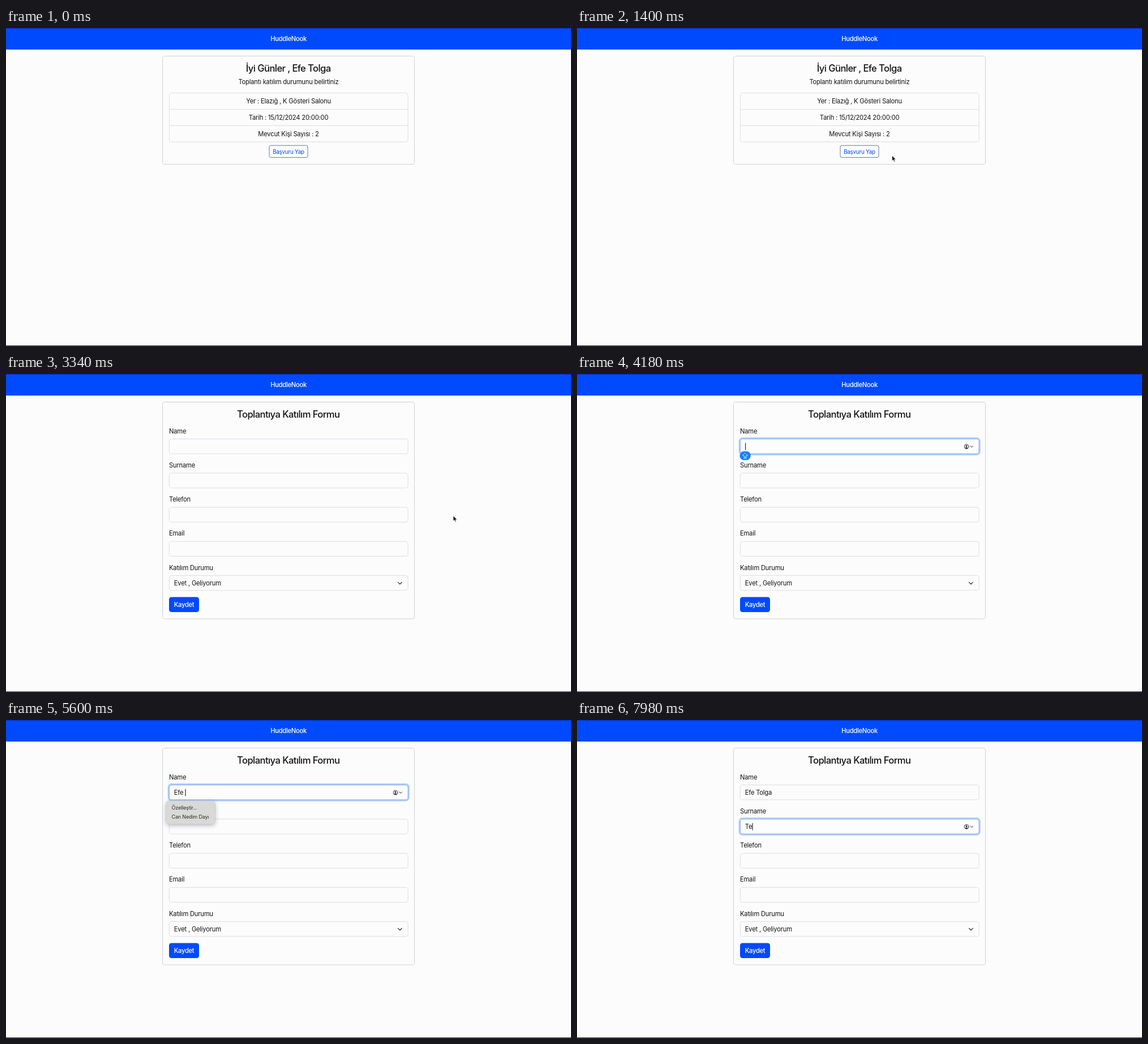
An HTML page that plays this animation: 998x561 px, repeating every 8000 ms.

```html
<!DOCTYPE html>
<html lang="tr">
<head>
<meta charset="utf-8">
<title>Toplantı</title>
<style>
html, body { margin: 0; width: 100%; height: 100%; overflow: hidden; background: #fcfcfc; }
svg { display: block; width: 100vw; height: 100vh; }
text { font: 400 11.2px Inter, "Open Sans", sans-serif; letter-spacing: -0.018em; fill: #111214; white-space: pre; }
.mid { text-anchor: middle; }
.title { font-size: 16.6px; font-weight: 500; letter-spacing: -0.035em; }
.strong { font-weight: 500; fill: #fff; letter-spacing: -0.025em; }
.small { font-size: 9.8px; letter-spacing: -0.022em; }
.tiny { font-size: 9px; letter-spacing: -0.02em; fill: #2b2b2b; }
.box { fill: none; stroke: #d9dae2; stroke-width: 0.9; }
.card { fill: none; stroke: #cacbd0; stroke-width: 0.9; }
.icon { fill: none; stroke: #222; stroke-linecap: round; stroke-linejoin: round; }
</style>
</head>
<body>
<svg id="stage" viewBox="0 0 998 561" preserveAspectRatio="none"></svg>
<script>
const BLUE = '#004afd';
const PITCH = 60.25;
const LOOP = 8000;
const $ = id => document.getElementById(id);

const text = (x, y, str, cls = '', id = '') => `<text id="${id}" class="${cls}" x="${x}" y="${y}">${str}</text>`;
const rect = (x, y, w, h, r, attrs) => `<rect x="${x}" y="${y}" width="${w}" height="${h}" rx="${r}" ${attrs}/>`;
const path = (d, attrs) => `<path d="${d}" ${attrs}/>`;

const welcome = `<g id="welcome">
  ${rect(276.5, 49.5, 445, 191, 4.2, 'class="card"')}
  ${text(498.7, 77, 'İyi Günler , Efe Tolga', 'title mid')}
  ${text(499, 99, 'Toplantı katılım durumunu belirtiniz', 'mid')}
  ${rect(288.5, 114.5, 421.5, 86.4, 4.2, 'class="box"')}
  ${path('M288.5 143.5H710M288.5 172.1H710', 'class="box"')}
  ${['Yer : Elazığ , K Gösteri Salonu', 'Tarih : 15/12/2024 20:00:00', 'Mevcut Kişi Sayısı : 2']
    .map((s, i) => text(499, 133 + i * 28.8, s, 'mid')).join('')}
  ${rect(465, 207.2, 68, 21.2, 2.8, 'fill="none" stroke="#4d6d9c" stroke-width="0.9"')}
  ${rect(465, 207.2, 68, 21.2, 2.8, `id="hover" fill="${BLUE}"`)}
  ${text(499, 221.5, 'Başvuru Yap', 'small mid', 'apply')}
</g>`;

const fields = ['Name', 'Surname', 'Telefon', 'Email', 'Katılım Durumu'].map((s, i) =>
  text(288, 104.6 + i * PITCH, s) + rect(288.3, 114.6 + i * PITCH, 421.8, 26.2, 4.2, 'class="box"')).join('');

const focusRing = i => `<g id="ring${i}" transform="translate(0 ${i * PITCH})">
  ${rect(287, 113.2, 424.4, 29, 5.4, 'fill="none" stroke="#b5cffb" stroke-width="2.8"')}
  ${rect(288.3, 114.6, 421.8, 26.2, 4.2, 'fill="#fdfdfd" stroke="#6f9ff3" stroke-width="0.9"')}
  <g class="icon"><circle cx="688" cy="128" r="3.9" stroke-width="0.9"/>
    <circle cx="688" cy="126.9" r="1.5" fill="#222" stroke="none"/>
    ${path('M685.4 130.7Q688 127.9 690.6 130.7L688 131.8Z', 'fill="#222" stroke="none"')}
    ${path('M694.9 127l2.3 2.1 2.3-2.1', 'stroke-width="1"')}</g>
</g>`;

const form = `<g id="form">
  ${rect(276.5, 49.5, 445, 382.5, 4.2, 'class="card"')}
  ${text(498.7, 77, 'Toplantıya Katılım Formu', 'title mid')}
  ${fields}
  ${text(296.8, 373, 'Evet , Geliyorum')}
  ${path('M692.4 367.4l3.4 3.3 3.4-3.3', 'class="icon" stroke-width="1.2"')}
  ${rect(288, 393.5, 53, 26.5, 4.2, `fill="${BLUE}"`)}
  ${text(314.5, 411, 'Kaydet', 'strong mid')}
  ${focusRing(0)}${focusRing(1)}
  ${text(296.8, 132, '', '', 'value0')}${text(296.8, 132 + PITCH, '', '', 'value1')}
  ${path('M0 121.8v12.4', 'id="caret" stroke="#111" stroke-width="1.1"')}
  <g id="caps">${rect(287.4, 136.2, 19.4, 15.8, 7.9, 'fill="#1681fb"')}
    ${path('M297 139.3l4.6 4.5h-2.4v2.3h-4.4v-2.3h-2.4zM294.8 147.6h4.4v1.5h-4.4z', 'fill="none" stroke="#d8eaff" stroke-width="0.8" stroke-linejoin="round"')}</g>
  <g id="popup">${rect(282.5, 142.5, 87, 41, 6, 'fill="#d9d9d8" stroke="#c2c2c4" stroke-width="0.6" filter="url(#shadow)"')}
    ${text(292.6, 158.4, 'Özelleştir...', 'tiny')}${text(292.6, 174, 'Can Nedim Dayı', 'tiny')}</g>
</g>`;

$('stage').innerHTML = `<defs><filter id="shadow" x="-20%" y="-30%" width="140%" height="170%">
    <feDropShadow dx="0" dy="2.5" stdDeviation="3.5" flood-color="#334" flood-opacity="0.32"/></filter></defs>
  <rect width="998" height="561" fill="#fcfcfc"/>
  <rect width="998" height="38" fill="${BLUE}"/>
  <rect width="998" height="1" fill="#0a2bb4"/>
  <rect y="560" width="998" height="1" fill="#2c2c58"/>
  ${text(499, 23, 'HuddleNook', 'strong mid')}
  ${welcome}${form}
  ${path('M0 0V9.6L2.2 7.6 3.8 11.2 5.3 10.5 3.8 7H6.8Z', 'id="cursor" fill="#111" stroke="#fff" stroke-width="0.7" stroke-linejoin="round"')}`;

// Timeline in ms
const OPEN = 1960, FOCUS = 3860, TAB = 6680;
const typed = [
  { str: 'Efe Tolga', keys: [4740, 5140, 5300, 5440, 6040, 6180, 6300, 6430, 6550] },
  { str: 'Te', keys: [7640, 7880] }
];
const capsOn = [[4080, 5040], [7360, 7880]];
const popupOn = [5180, 6040];
const resets = [FOCUS, 4080, TAB, ...typed[0].keys, ...typed[1].keys];
// Pointer stops: time, x, y
const stops = [[1060, 640, 300], [1400, 556.5, 225], [1720, 508, 219], [2280, 508, 219],
  [2640, 753, 245], [3200, 790, 250], [3400, 790, 250], [3800, 470, 129], [4080, 470, 129]];

const clamp = v => Math.max(0, Math.min(1, v));
const ease = v => v * v * (3 - 2 * v);
const fade = (t, at) => ease(clamp((t - at) / 150));
const within = (t, [a, b]) => t >= a && t < b;
const show = (id, on) => $(id).setAttribute('visibility', on ? 'inherit' : 'hidden');
const opacity = (id, v) => $(id).setAttribute('opacity', v);

function pointer(t) {
  const i = stops.findIndex((s, k) => k && t < s[0]);
  if (i < 0 || t < stops[0][0]) return null;
  const [a, b] = [stops[i - 1], stops[i]];
  const k = ease((t - a[0]) / (b[0] - a[0]));
  return [a[1] + (b[1] - a[1]) * k, a[2] + (b[2] - a[2]) * k];
}

function draw(t) {
  show('welcome', t < OPEN);
  show('form', t >= OPEN);

  const hover = fade(t, 1640);
  opacity('hover', hover);
  $('apply').style.fill = hover > 0.5 ? '#fff' : BLUE;

  opacity('ring0', fade(t, FOCUS) * (1 - fade(t, TAB)));
  opacity('ring1', fade(t, TAB));
  typed.forEach(({ str, keys }, i) => {
    $('value' + i).textContent = str.slice(0, keys.filter(k => k <= t).length);
  });

  const row = t < TAB ? 0 : 1;
  const last = Math.max(...resets.filter(k => k <= t));
  show('caret', t >= FOCUS && (t - last) % 1000 < 500);
  const x = 297.6 + $('value' + row).getComputedTextLength();
  $('caret').setAttribute('transform', `translate(${x} ${row * PITCH})`);

  show('caps', capsOn.some(span => within(t, span)));
  $('caps').setAttribute('transform', `translate(0 ${row * PITCH})`);
  show('popup', within(t, popupOn));

  const p = pointer(t);
  show('cursor', p);
  if (p) $('cursor').setAttribute('transform', `translate(${p})`);
}

const start = performance.now();
function tick() {
  draw((performance.now() - start) % LOOP);
  requestAnimationFrame(tick);
}
tick();
</script>
</body>
</html>
```
